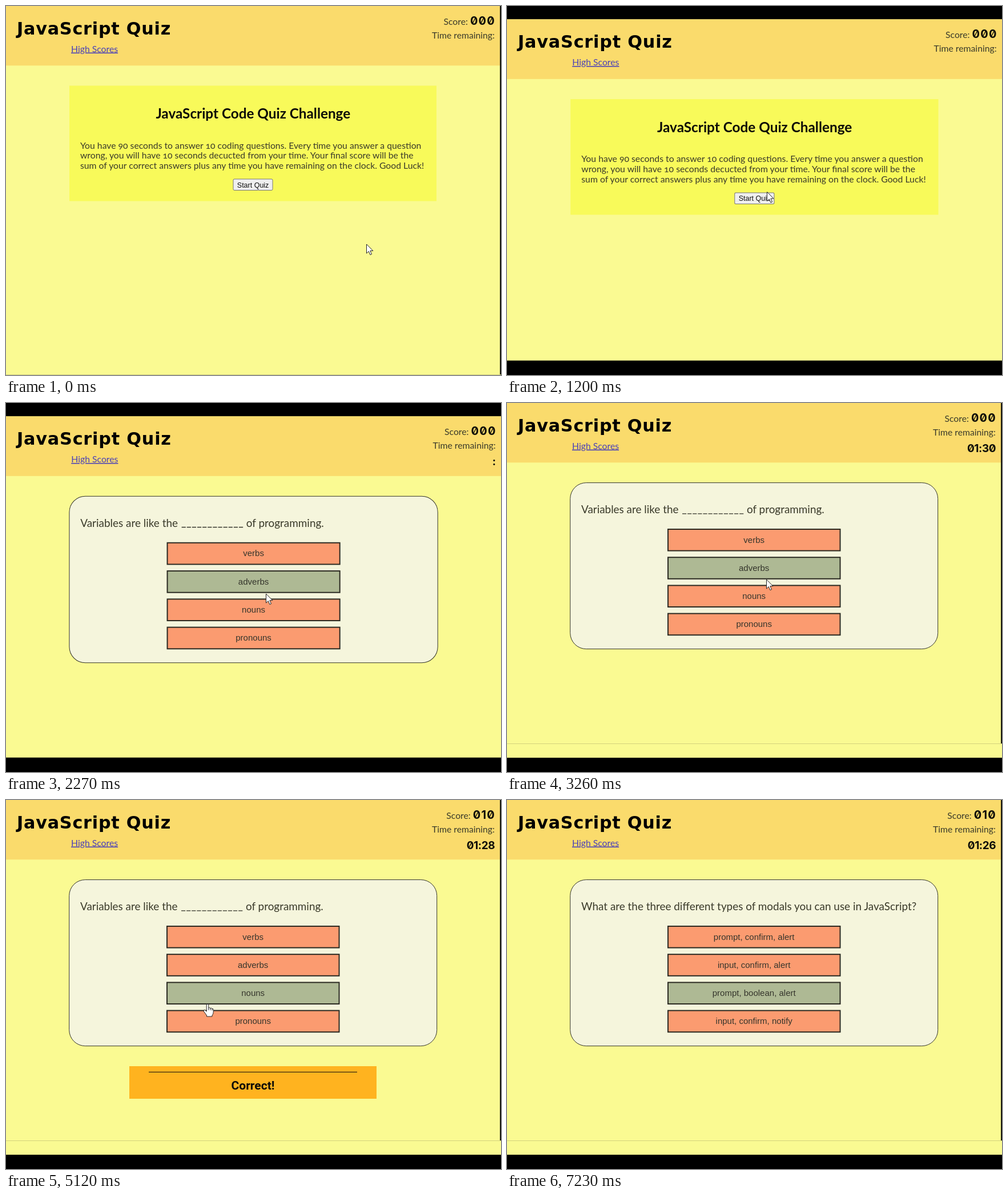
Recreate the animation shown at these times as an HTML page. Size 867x646 px, loop 8 s.

```html
<!DOCTYPE html>
<html lang="en">
<head>
<meta charset="utf-8">
<title>JavaScript Quiz</title>
<style>
html, body { margin: 0; width: 100%; height: 100%; overflow: hidden; background: #000; }
svg { display: block; width: 867px; height: 646px; }
text { font: 15.76px Lato, sans-serif; font-variant-numeric: oldstyle-nums; fill: #3a3a2a; white-space: pre; }
.mid { text-anchor: middle; }
.end { text-anchor: end; }
#title { font: 700 30.2px "DejaVu Sans", sans-serif; letter-spacing: 0.8px; fill: #000; }
#link { fill: #4a40b8; text-decoration: underline; }
.digits { font: 700 20px Inter, sans-serif; font-feature-settings: "zero"; fill: #0c0c08; }
#score { letter-spacing: 1.2px; }
#clock { font-size: 19px; letter-spacing: -0.5px; }
#heading { font-size: 24.3px; font-weight: 700; fill: #0c0c08; }
#startLabel { font: 12.5px "Liberation Sans", Arial, sans-serif; fill: #111; }
.question { font-size: 18.9px; }
.answer text { font: 15px "Liberation Sans", Arial, sans-serif; fill: #35352c; }
.answer rect { fill: #fb9b70; stroke: #2b2a22; stroke-width: 2; }
.answer.hover rect { fill: #aeb994; }
#verdict { font: 700 21px Roboto, sans-serif; fill: #0c0c08; }
.cursor { fill: #fff; stroke: #222; stroke-linejoin: round; }
</style>
</head>
<body>
<svg viewBox="0 0 867 646">
  <rect id="paper" width="867" fill="#fafa92"/>
  <g id="page">
    <rect width="865.4" height="104.3" fill="#fadb6c"/>
    <text id="title" x="19" y="50">JavaScript Quiz</text>
    <text id="link" x="114" y="80.5">High Scores</text>
    <text class="end" x="857" y="33">Score: <tspan id="score" class="digits"></tspan></text>
    <text class="end" x="856" y="57">Time remaining:</text>
    <text id="clock" class="end digits" x="856" y="85.5"></text>

    <g id="intro">
      <rect x="111" y="139.5" width="643" height="202" fill="#f8fa5a"/>
      <text id="heading" class="mid" x="432.8" y="197">JavaScript Code Quiz Challenge</text>
      <text x="130" y="249.5">You have 90 seconds to answer 10 coding questions. Every time you answer a question</text>
      <text x="130" y="267.2">wrong, you will have 10 seconds decucted from your time. Your final score will be the</text>
      <text x="130" y="284.7">sum of your correct answers plus any time you have remaining on the clock. Good Luck!</text>
      <rect x="398" y="303" width="69" height="19.5" rx="2" fill="#efefef" stroke="#767676"/>
      <text id="startLabel" class="mid" x="432.6" y="317.5">Start Quiz</text>
    </g>

    <g id="quiz">
      <rect x="110.7" y="139.6" width="644" height="291" rx="28" fill="#f5f5dc" stroke="#33332a"/>
      <g id="first">
        <text class="question" x="130" y="193">Variables are like the</text>
        <path d="M307 193.8H414.5" stroke="#33332a" stroke-width="1.3" stroke-dasharray="7.2 1.9"/>
        <text class="question" x="420" y="193">of programming.</text>
      </g>
      <text id="second" class="question" x="130" y="193">What are the three different types of modals you can use in JavaScript?</text>
      <g id="answers"></g>
    </g>

    <g id="banner">
      <rect x="216" y="466" width="433" height="57" fill="#ffb31f"/>
      <path d="M250 476.4H615" stroke="#33290f" stroke-width="1.2"/>
      <text id="verdict" class="mid" x="432.5" y="506.5">Correct!</text>
    </g>
  </g>
  <g id="edge">
    <rect id="side" x="865.2" width="1.8" fill="#000"/>
    <rect id="rule" width="867" height="1" fill="#d3d27c"/>
  </g>
  <path id="arrow" class="cursor" d="M0 0V16L3.8 12.5 6.4 18.6 9 17.5 6.4 11.6H11.4Z"/>
  <g id="hand" class="cursor">
    <path d="M-1.8 1.2Q0-1 1.8 1.2V7Q3.6 5.8 5 7.6 6.8 6.6 8 8.3 10.2 7.8 10.2 10.2V14.5Q10 18 8 20V22H-1.5V20L-6.7 13Q-7.4 10.2-4.8 10.6L-1.8 13.2Z"/>
    <path d="M1.8 7V11M5 7.6V11M8 8.3V11.5" fill="none"/>
  </g>
</svg>
<script>
const LOOP = 8000, START = 2180, RESIZE = 3260, CLICK = 5120, NEXT = 7130;
const ROW_TOP = 220, ROW_STEP = 49.2;
const LABELS = [
  ["verbs", "adverbs", "nouns", "pronouns"],
  ["prompt, confirm, alert", "input, confirm, alert", "prompt, boolean, alert", "input, confirm, notify"]
];
// Cursor tip: time, x, y
const PATH = [
  [0, 631.5, 417], [100, 631.5, 417], [300, 366, 392], [850, 366, 392], [1200, 455.5, 325.5],
  [1690, 455.5, 327], [1780, 455.5, 327], [1900, 455.5, 334], [RESIZE, 455.5, 334],
  [RESIZE, 454.5, 309], [3330, 454.5, 309], [4040, 335, 250], [4080, 335, 250], [4430, 353, 357]
];
// Clock text from each time on
const TICKS = [[0, ""], [START, ":"], [RESIZE, "01:30"], [4240, "01:29"], [CLICK, "01:28"], [6230, "01:27"], [7230, "01:26"]];

const $ = id => document.getElementById(id);
const show = (id, on) => $(id).style.display = on ? "" : "none";
const set = (id, attrs) => { for (const k in attrs) $(id).setAttribute(k, attrs[k]); };

$("answers").innerHTML = LABELS[0].map((_, i) =>
  `<g class="answer" transform="translate(281 ${ROW_TOP + i * ROW_STEP})">
    <rect x="1" y="1" width="301.5" height="37.6"/><text class="mid" x="151.7" y="24.6"></text></g>`).join("");
const rows = [...document.querySelectorAll(".answer")];

function cursorAt(t) {
  const i = PATH.findIndex(p => p[0] > t);
  if (i < 0) return PATH[PATH.length - 1].slice(1);
  const [t0, x0, y0] = PATH[i - 1], [t1, x1, y1] = PATH[i];
  const k = (t - t0) / (t1 - t0), e = k * k * (3 - 2 * k);
  return [x0 + (x1 - x0) * e, y0 + (y1 - y0) * e];
}

function draw(t) {
  const boxed = t >= 100 && t < RESIZE, late = t >= RESIZE, inQuiz = t >= START;
  const scale = boxed ? 1.002 : 1, shift = boxed ? 23.3 : 0, bottom = late ? 596 : 645;
  set("paper", { y: shift, height: boxed ? 597.4 : late ? 621 : 646 });
  set("page", { transform: `translate(0 ${shift}) scale(${scale})` });
  set("side", { height: bottom });
  set("rule", { y: bottom });
  show("edge", !boxed);

  show("intro", !inQuiz);
  show("quiz", inQuiz);
  show("first", t < NEXT);
  show("second", t >= NEXT);
  show("banner", t >= CLICK && t < NEXT);
  $("score").textContent = t < CLICK ? "000" : "010";
  $("clock").textContent = TICKS.filter(c => c[0] <= t).pop()[1];

  const [x, y] = cursorAt(t), pageY = (y - shift) / scale;
  let over = false;
  rows.forEach((row, i) => {
    const d = pageY - ROW_TOP - i * ROW_STEP, hit = inQuiz && d >= 0 && d < 41;
    over = over || hit;
    row.classList.toggle("hover", hit);
    row.lastChild.textContent = LABELS[t < NEXT ? 0 : 1][i];
  });
  const pointing = over && t > 3350;
  for (const id of ["arrow", "hand"]) set(id, { transform: `translate(${x} ${y})` });
  show("arrow", t < NEXT && !pointing);
  show("hand", t < NEXT && pointing);
}

const began = performance.now();
(function frame() {
  draw((performance.now() - began) % LOOP);
  requestAnimationFrame(frame);
})();
</script>
</body>
</html>
```
